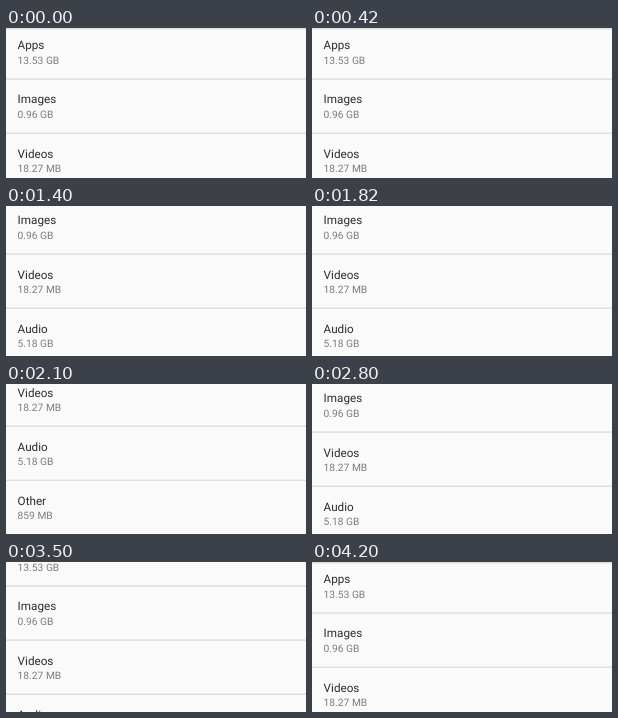
Recreate the animation shown at these times as an HTML page. Size 300 px wide and 150 px high, loop 4.9 s.

```html
<!DOCTYPE html>
<html lang="en">
<head>
<meta charset="utf-8">
<style>
  html, body { margin: 0; width: 100%; height: 100%; overflow: hidden; background: #fafafa; }
  svg {
    display: block; width: 300px; height: 150px;
    font-family: Roboto, sans-serif; text-rendering: geometricPrecision;
  }
  .title { font-size: 11.7px; fill: #2c2c2c; }
  .size { font-size: 10.25px; fill: #7c7c7c; }
  .divider { height: 1.5px; width: 300px; fill: #e0e0e0; }
</style>
</head>
<body>
<svg viewBox="0 0 300 150"><g id="list"></g></svg>
<script>
const ROW = 54.1, STEP = 700;
const scrolls = [0, 27, 57, 117, 57, 27, 0];
const items = [
  ['Apps', '13.53 GB'],
  ['Images', '0.96 GB'],
  ['Videos', '18.27 MB'],
  ['Audio', '5.18 GB'],
  ['Other', '859 MB']
];
const list = document.getElementById('list');

list.innerHTML = items.map(([title, size], i) => {
  const y = i * ROW;
  const divider = i ? y - 3.8 : 0;
  return `<rect class="divider" y="${divider}"/>
    <text class="title" x="11.6" y="${y + 21.3}">${title}</text>
    <text class="size" x="11.6" y="${y + 36}">${size}</text>`;
}).join('');

function draw(now) {
  const step = Math.floor(now / STEP) % scrolls.length;
  list.setAttribute('transform', `translate(0 ${-scrolls[step]})`);
  requestAnimationFrame(draw);
}
requestAnimationFrame(draw);
</script>
</body>
</html>
```
